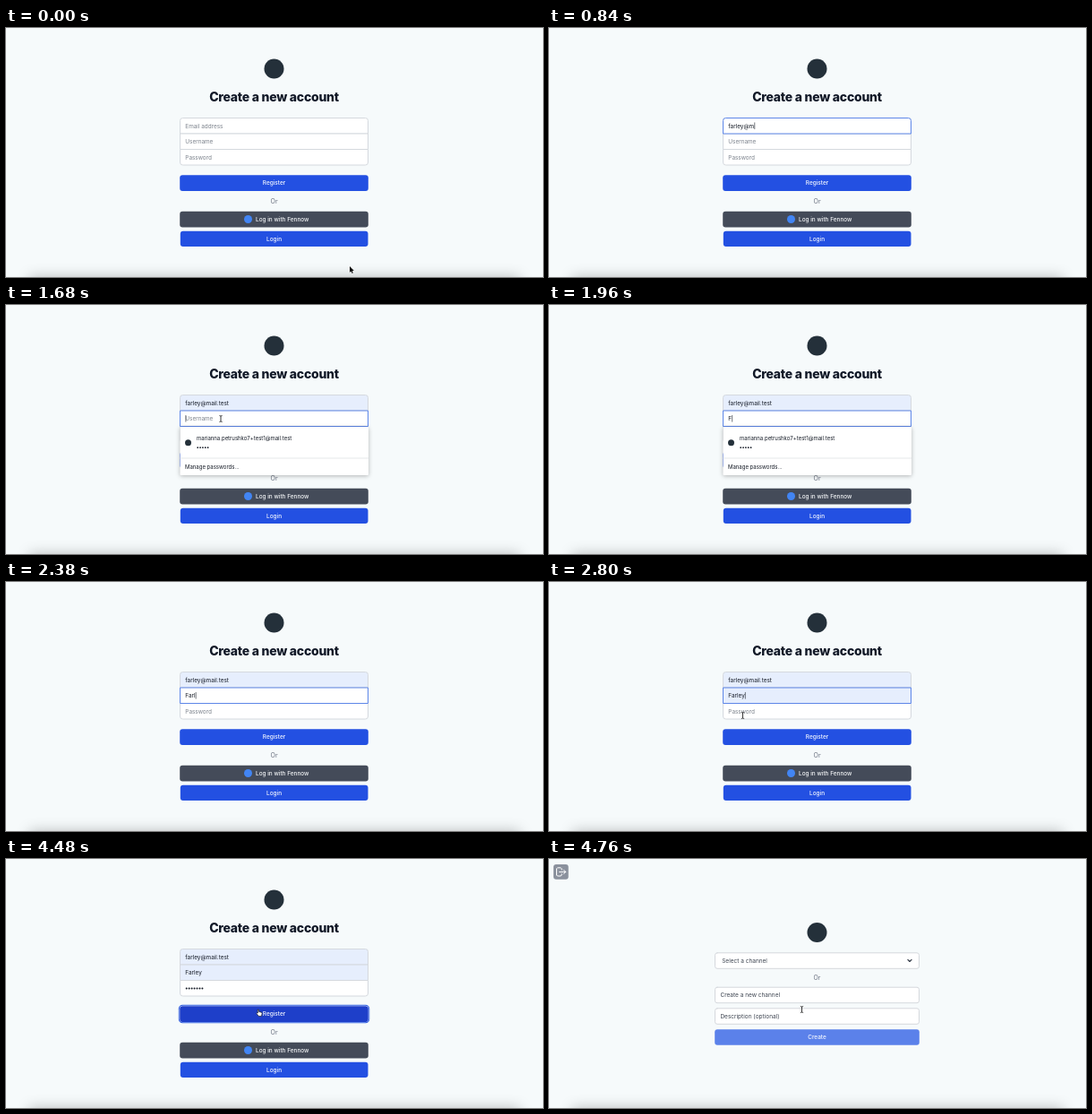
An HTML page with a canvas for the animation above (4.9 s loop, 600 by 278 pixels).

```html
<!DOCTYPE html>
<html lang="en">
<head>
<meta charset="utf-8">
<title>Create a new account</title>
<style>
html, body { margin: 0; width: 100%; height: 100%; overflow: hidden; background: #f6fafb; }
canvas { display: block; width: 600px; height: 278px; }
</style>
</head>
<body>
<canvas id="stage"></canvas>
<script>
const W = 600, H = 278, STEP = 140, LOOP = 4900;
const EMAIL = 'farley@mail.test', USER = 'Farley';
const SAVED = 'marianna.petrushko7+test1@mail.test';
const INK = '#151b26', MUTED = '#7b818b', LOGO = '#24303a', BLUE = '#2350e2', FILLED = '#e6eefd';

const canvas = document.getElementById('stage');
const ctx = canvas.getContext('2d');
const ratio = window.devicePixelRatio || 1;
canvas.width = W * ratio;
canvas.height = H * ratio;

function box(x, y, w, h, r, fill, stroke) {
  ctx.beginPath();
  ctx.roundRect(x, y, w, h, r);
  if (fill) { ctx.fillStyle = fill; ctx.fill(); }
  if (stroke) { ctx.strokeStyle = stroke; ctx.lineWidth = 1; ctx.stroke(); }
}

function disc(x, y, r, color) {
  ctx.beginPath();
  ctx.arc(x, y, r, 0, Math.PI * 2);
  ctx.fillStyle = color;
  ctx.fill();
}

function line(points, color, width) {
  ctx.beginPath();
  points.forEach(([x, y]) => ctx.lineTo(x, y));
  ctx.strokeStyle = color;
  ctx.lineWidth = width;
  ctx.stroke();
}

// Draws text vertically centred on y and returns its width.
function text(str, x, y, { size = 6.45, weight = 400, color = INK, align = 'left', spacing = 0 } = {}) {
  ctx.font = `${weight} ${size}px Inter, sans-serif`;
  ctx.letterSpacing = spacing + 'px';
  ctx.textAlign = align;
  ctx.fillStyle = color;
  ctx.fillText(str, x, y + size * 0.36);
  return ctx.measureText(str).width;
}

function dots(count, x, y, r, pitch) {
  for (let i = 0; i < count; i++) disc(x + i * pitch, y, r, INK);
  return count * pitch;
}

function button(label, x, y, w, h, color) {
  box(x, y, w, h, 3, color);
  text(label, 299.5, y + h / 2, { weight: 500, color: '#f4f7ff', align: 'center' });
}

function withShadow(color, blur, dy, draw) {
  ctx.save();
  ctx.shadowColor = color;
  ctx.shadowBlur = blur * ratio;
  ctx.shadowOffsetY = dy * ratio;
  draw();
  ctx.restore();
}

function backdrop() {
  ctx.fillStyle = '#f6fafb';
  ctx.fillRect(0, 0, W, H);
  withShadow('rgba(0,0,0,.25)', 15, 0, () => box(26, H, 548, 30, 0, '#d5d8d9'));
}

// Cursor stops: step, x, y.
const stops = [
  [0, 384, 266], [1, 374, 250], [4, 250, 110], [7, 250, 110], [9, 290, 262], [10, 288, 248],
  [12, 240, 127], [18, 240, 127], [20, 216.5, 149], [27, 216.5, 149],
  [31, 283, 172], [32, 283, 172], [33, 282.5, 168], [35, 282.5, 168]
];

function cursorAt(n) {
  const i = stops.findIndex((s, k) => k > 0 && n <= s[0]);
  const [n0, x0, y0] = stops[i - 1], [n1, x1, y1] = stops[i];
  const p = (n - n0) / (n1 - n0), e = p * p * (3 - 2 * p);
  return [x0 + (x1 - x0) * e, y0 + (y1 - y0) * e];
}

const within = (n, a, b) => n >= a && n <= b;
const inside = (y, a, b) => y >= a && y <= b;

function arrow() {
  ctx.beginPath();
  [[0, 0], [0, 7], [1.6, 5.6], [2.6, 8], [3.8, 7.4], [2.8, 5.2], [4.9, 5.1]].forEach(([x, y]) => ctx.lineTo(x, y));
  ctx.closePath();
  ctx.strokeStyle = '#fff';
  ctx.lineWidth = 1;
  ctx.stroke();
  ctx.fillStyle = '#0a0a0a';
  ctx.fill();
}

function beam() {
  line([[0, -3], [0, 3]], '#222', 0.9);
  line([[-1.6, -3.6], [0, -3], [1.6, -3.6]], '#222', 0.8);
  line([[-1.6, 3.6], [0, 3], [1.6, 3.6]], '#222', 0.8);
}

function hand() {
  ctx.beginPath();
  [[-1.9, -3.8], [-0.7, -3.8], [-0.3, -1.4], [2.6, -0.8], [3.1, 0.4], [2.5, 3.4], [-0.7, 3.4], [-3.1, 0.4], [-2.3, -0.3], [-1.6, 0]]
    .forEach(([x, y]) => ctx.lineTo(x, y));
  ctx.closePath();
  ctx.fillStyle = '#fff';
  ctx.fill();
  ctx.strokeStyle = '#16181d';
  ctx.lineWidth = 0.7;
  ctx.stroke();
}

function cursor(n) {
  if (within(n, 5, 7) || within(n, 13, 18) || within(n, 23, 27)) return;
  const [x, y] = cursorAt(n);
  const overForm = n < 33 && x > 194 && x < 405;
  let shape = arrow;
  if (n >= 33 || overForm && inside(y, 100, 153)) shape = beam;
  else if (overForm && (inside(y, 164, 182) || inside(y, 204, 244))) shape = hand;
  ctx.save();
  ctx.translate(x, y);
  shape();
  ctx.restore();
}

function field(row, { value = '', hint, filled, focus, secret = 0 }) {
  const y = 100.5 + row * 17.5, mid = y + 8.75;
  const r = row === 0 ? [3, 3, 0, 0] : row === 2 ? [0, 0, 3, 3] : 0;
  box(194.5, y, 210, 17.5, r, filled ? FILLED : '#fff', focus ? '#5d86e8' : '#d5d9de');
  let w = 0;
  if (secret) w = dots(secret, 201.7, mid + 0.3, 1, 2.95);
  else if (value) w = text(value, 200.3, mid, { size: 6.4 });
  else text(hint, 200.3, mid, { size: 6.4, color: MUTED });
  if (focus) line([[200.9 + w, mid - 3.8], [200.9 + w, mid + 3.8]], INK, 0.6);
}

function savedLogins() {
  withShadow('rgba(0,0,0,.28)', 5, 1, () => box(194.5, 136, 210.5, 54, 1, '#fff'));
  disc(203.5, 153.7, 3.5, LOGO);
  text(SAVED, 213, 148.5, { size: 6 });
  dots(5, 214.2, 159.2, 0.85, 2.85);
  line([[194.5, 171], [405, 171]], '#dfe2e5', 0.8);
  text('Manage passwords...', 200, 181, { size: 6 });
}

function registerPage(n) {
  disc(299.5, 45.5, 11, LOGO);
  text('Create a new account', 299.5, 77, { size: 14, weight: 800, color: '#111827', align: 'center', spacing: -0.25 });

  const email = EMAIL.slice(0, Math.max(0, n - 4) * 4);
  const user = USER.slice(0, Math.max(0, n - 13));
  const secret = Math.min(7, Math.max(0, Math.floor((n - 22) * 1.5)));
  const active = n < 4 || n > 30 ? -1 : n < 12 ? 0 : n < 22 ? 1 : 2;
  const rows = [
    { value: email, hint: 'Email address', filled: n >= 8 },
    { value: user, hint: 'Username', filled: n >= 19 },
    { secret, hint: 'Password' }
  ];
  rows.forEach((r, i) => field(i, r));
  if (active >= 0) field(active, { ...rows[active], focus: true });

  const pressed = n >= 31;
  if (pressed) {
    box(192.8, 162.8, 213.4, 20.4, 4.5, '#2b5be0');
    box(193.7, 163.7, 211.6, 18.6, 4, '#fff');
  }
  button('Register', 194.2, 164.2, 210.6, 17.8, pressed ? '#1e3fc9' : BLUE);
  text('Or', 299.5, 193.5, { size: 7.1, color: '#6b7280', align: 'center' });
  box(194.2, 204.7, 210.6, 17.8, 3, '#444b59');
  disc(270.5, 213.5, 4.5, '#4285f4');
  text('Log in with Fennow', 279, 213.5, { weight: 500, color: '#f4f6f8' });
  button('Login', 194.8, 226.7, 209.7, 17.2, BLUE);
  if (within(n, 12, 16)) savedLogins();
}

function exitIcon() {
  box(5, 6, 16.7, 16.7, 3, '#8b919d');
  ctx.lineCap = ctx.lineJoin = 'round';
  line([[14.2, 12.2], [14.2, 10.8], [13.2, 9.8], [9.5, 9.8], [8.5, 10.8], [8.5, 18], [9.5, 19], [13.2, 19], [14.2, 18], [14.2, 16.6]], '#fff', 1);
  line([[11.3, 14.4], [18.6, 14.4]], '#fff', 1);
  line([[16.5, 12.2], [18.7, 14.4], [16.5, 16.6]], '#fff', 1);
}

function channelPage() {
  ctx.save();
  exitIcon();
  disc(299.5, 82, 11, LOGO);
  const entry = (label, x, y) => {
    box(185.5, y, 228, 17.5, 2.5, '#fff', '#d5d8dd');
    text(label, x, y + 8.75, { size: 6.5, color: '#3d4450' });
  };
  entry('Select a channel', 193.2, 104.8);
  line([[400.9, 112.3], [403, 114.5], [405.1, 112.3]], '#2f3744', 1.1);
  text('Or', 299.5, 132.7, { size: 6.9, color: '#6b7280', align: 'center' });
  entry('Create a new channel', 191.4, 143.2);
  entry('Description (optional)', 191.4, 166.8);
  button('Create', 185.2, 190.2, 228.6, 17.6, '#5b81ea');
  ctx.restore();
}

function draw(now) {
  const n = Math.floor((now % LOOP) / STEP);
  ctx.setTransform(ratio, 0, 0, ratio, 0, 0);
  backdrop();
  if (n < 33) registerPage(n);
  else channelPage();
  cursor(n);
}

const start = performance.now();
function tick() {
  draw(performance.now() - start);
  requestAnimationFrame(tick);
}
tick();
</script>
</body>
</html>
```
